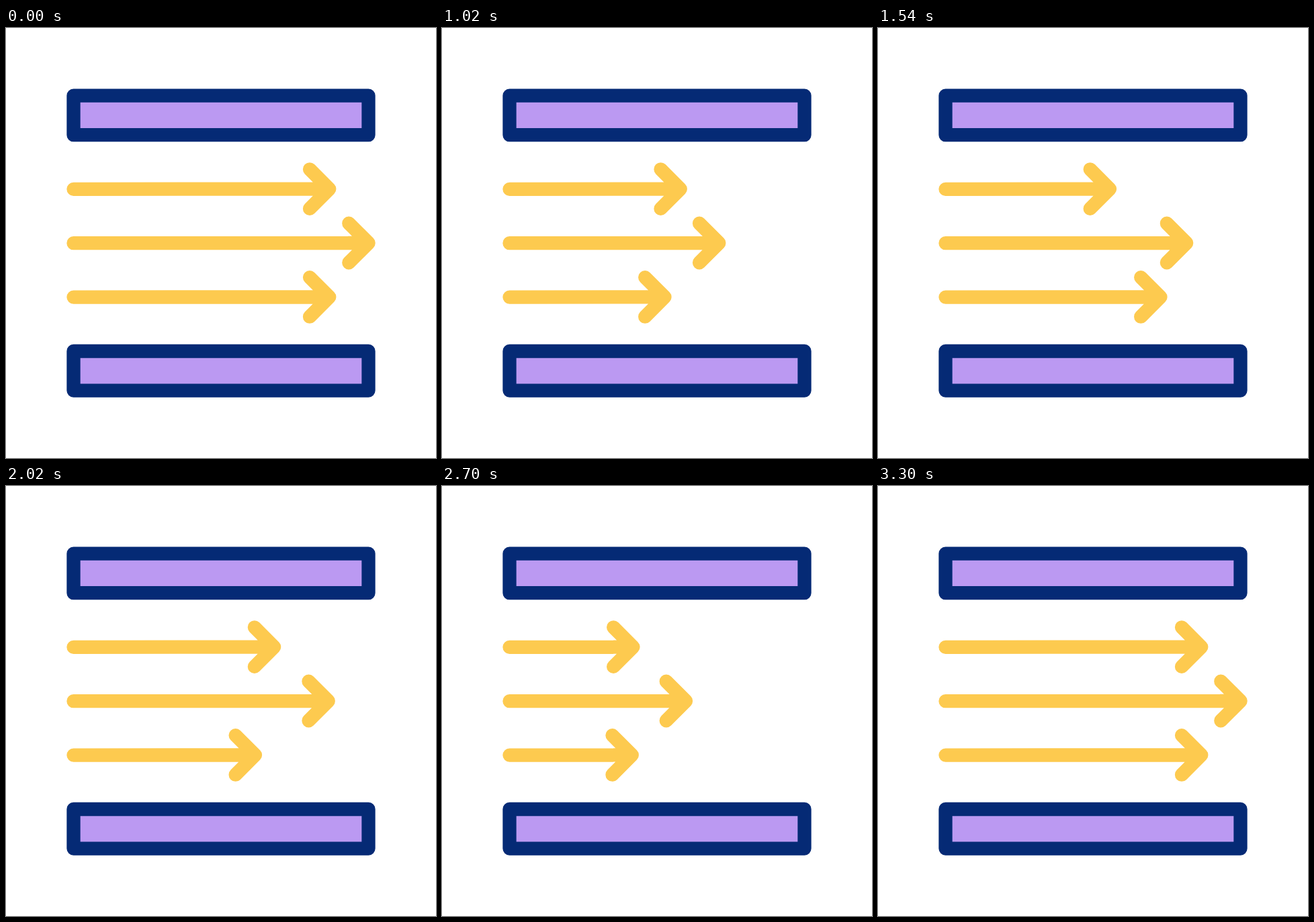
An HTML page that plays this animation: 640x640 px, repeating every 3.6 s.

```html
<!DOCTYPE html>
<html>
<head>
<meta charset="utf-8">
<style>
html, body { margin: 0; width: 100%; height: 100%; overflow: hidden; background: #fff; }
svg { display: block; width: 100vw; height: 100vh; stroke-width: 20.3; stroke-linecap: round; stroke-linejoin: round; }
rect { fill: #bb99f2; stroke: #052a75; }
path { fill: none; stroke: #fdca4f; }
</style>
</head>
<body>
<svg viewBox="0 0 640 640">
  <rect x="100.5" y="100.6" width="439" height="58.6"/>
  <rect x="100.5" y="481" width="439" height="58.6"/>
  <path/><path/><path/>
</svg>
<script>
const LOOP = 3600;

// Each arrow pulls back, eases forward, pulls back further and returns.
// bend shifts the three turning points later (< 1) or earlier (> 1).
const arrows = [
  { rest: 481.3, start: 430, end: 3300, bend: 0.88, turns: [160, 81.5, 199] },
  { rest: 539.6, start: 430, end: 3284, bend: 1, turns: [137, 41, 192] },
  { rest: 481.3, start: 360, end: 3265, bend: 1.09, turns: [150, 45, 242] }
];
const paths = document.querySelectorAll('path');

function pull({ start, end, bend, turns }, t) {
  const progress = (t - start) / (end - start);
  if (progress <= 0 || progress >= 1) return 0;
  const stops = [0, ...turns, 0];
  const at = i => (i / 4) ** bend;
  const i = Math.floor(4 * progress ** (1 / bend));
  const part = (progress - at(i)) / (at(i + 1) - at(i));
  const ease = (1 - Math.cos(Math.PI * part)) / 2;
  return stops[i] + (stops[i + 1] - stops[i]) * ease;
}

function draw() {
  const t = performance.now() % LOOP;
  arrows.forEach((arrow, i) => {
    const y = 239.6 + 80.4 * i;
    const tip = arrow.rest - pull(arrow, t);
    paths[i].setAttribute('d', `M100.5 ${y + 0.2}L${tip} ${y}m-29.3 -29.3l29.3 29.3l-29.3 29.3`);
  });
  requestAnimationFrame(draw);
}
draw();
</script>
</body>
</html>
```
